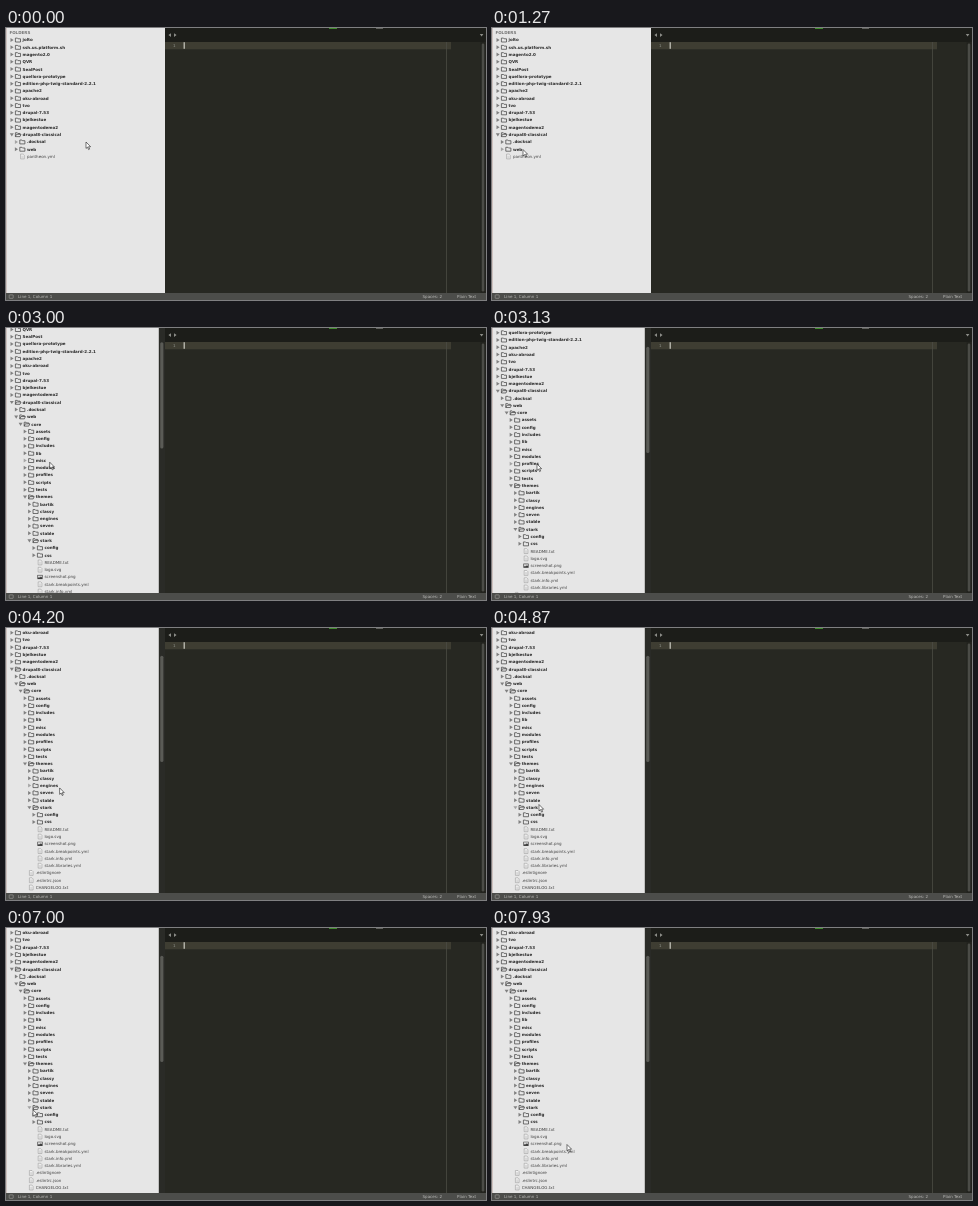
An HTML page that plays this animation: 480x272 px, repeating every 8000 ms.

```html
<!DOCTYPE html>
<html lang="en">
<head>
<meta charset="utf-8">
<title>Editor sidebar</title>
<style>
  html, body { margin: 0; width: 100%; height: 100%; overflow: hidden; background: #272822; }
  svg { display: block; width: 100vw; height: 100vh; }
  text { font: 4.06px "DejaVu Sans", Verdana, sans-serif; text-rendering: geometricPrecision; white-space: pre; }
  .bold { font-weight: bold; }
  .tree text { fill: #2b2b2b; }
  .tree .head { fill: #747474; }
  .tree .file { fill: #404040; }
  .line { fill: none; stroke: #464646; stroke-width: .75; stroke-linejoin: round; }
  .page { fill: #f4f4f4; stroke: #8a8a8a; stroke-width: .5; }
  .status text { fill: #b9b9b6; }
</style>
</head>
<body>
<svg viewBox="0 0 480 272" preserveAspectRatio="none">
  <defs>
    <clipPath id="view"><rect width="159" height="265"/></clipPath>
  </defs>

  <rect width="480" height="272" fill="#272822"/>
  <rect x="159" width="321" height="14" fill="#1c1d19"/>
  <rect x="323" width="8" height="1" fill="#3f8a2c"/>
  <rect x="370" width="7" height=".8" fill="#6f706c"/>
  <path d="M165 5.2v3.8l-2.6-1.9zM168 5.2v3.8l2.6-1.9zM473.8 6h3.6l-1.8 2.6z" fill="#8c8d88"/>
  <rect x="159" y="14" width="286" height="7.3" fill="#3e3d32"/>
  <rect x="440" y="14" width=".8" height="251" fill="#4b4c44"/>
  <text x="167" y="19.2" fill="#90918b">1</text>
  <rect id="caret" x="177.7" y="14.2" width=".9" height="6.6" fill="#f8f8f0"/>
  <rect x="474.5" y="14" width="5.5" height="251" fill="#22231e"/>
  <rect x="475.7" y="15.5" width="2.6" height="248" rx="1.3" fill="#4b4c47"/>

  <rect width="159" height="265" fill="#e6e6e6"/>
  <g class="tree" clip-path="url(#view)"><g id="tree"></g></g>
  <rect width=".6" height="265" fill="#bfa9a4"/>
  <g id="bar">
    <rect x="152.8" width="6.2" height="265" fill="#2a2b27"/>
    <rect id="thumb" x="154.2" width="3.2" rx="1.6" fill="#5a5b56"/>
  </g>

  <g class="status">
    <rect y="265" width="480" height="7" fill="#4c4d4a"/>
    <rect x="3.2" y="266.9" width="4" height="3.4" rx=".5" fill="none" stroke="#a3a3a0" stroke-width=".6"/>
    <text x="12" y="270.2">Line 1, Column 1</text>
    <text x="416.5" y="270.2">Spaces: 2</text>
    <text x="451" y="270.2">Plain Text</text>
  </g>

  <path id="cursor" d="M0 0V6.4L1.5 5.1 2.6 7.6 3.6 7.1 2.6 4.7H4.6Z" fill="#fff" stroke="#1c1c1c" stroke-width=".6" stroke-linejoin="round"/>
</svg>

<script>
const $ = id => document.getElementById(id);
const PITCH = 7.28, TOP = 12, VIEW = 265;
const WEB = 15, HIDDEN = 71;
const LOOP = 8000, TICK = 0.015;

// Each entry: depth, then names; "+" marks an open folder, "=" a file.
const groups = [
  [0, "jolto ssh.us.platform.sh magento2.0 QVR SealPost quellora-prototype edition-php-twig-standard-2.2.1 apache2 oku-abroad tvo drupal-7.53 bjelkestue magentodemo2 +drupal8-classical"],
  [1, ".docksal web"],
  [2, "+core"],
  [3, "assets config includes lib misc modules profiles scripts tests +themes"],
  [4, "bartik classy engines seven stable +stark"],
  [5, "config css =README.txt =logo.svg =screenshot.png =stark.breakpoints.yml =stark.info.yml =stark.libraries.yml"],
  [3, "=.eslintignore =.eslintrc.json =CHANGELOG.txt"]
];

const CLOSED = "M-1.3 -2V2L1.8 0Z", OPEN = "M-2 -1.3H2L0 1.8Z";
const FOLDER = "M-2.6 2V-1.9H-.5L.1 -1.2H2.5V2Z";
const FOLDER_OPEN = "M-2.6 2V-1.9H-.7L-.1 -1.2H2V-.3M-2.6 2L-1.5 -.3H3L2 2Z";

function make(parent, tag, attrs, text) {
  const el = document.createElementNS("http://www.w3.org/2000/svg", tag);
  for (const key in attrs) el.setAttribute(key, attrs[key]);
  if (text) el.textContent = text;
  parent.appendChild(el);
  return el;
}

function addRow(depth, entry) {
  const file = entry[0] === "=", open = entry[0] === "+";
  const name = entry.replace(/^[+=]/, "");
  const x = 16.5 + 4.4 * depth;
  const g = make($("tree"), "g", {});
  const icon = make(g, "g", { transform: `translate(${x - 4.5} 0)` });
  const row = { g };
  if (!file) {
    row.arrow = make(g, "path", { d: open ? OPEN : CLOSED, transform: `translate(${x - 10.7} 0)` });
    row.icon = make(icon, "path", { class: "line", d: open ? FOLDER_OPEN : FOLDER });
  } else if (name.endsWith(".png")) {
    make(icon, "rect", { x: -2.6, y: -2.1, width: 5.2, height: 4.2, fill: "#3a3a3a" });
    make(icon, "path", { d: "M-2 -1.5H2V.4L.9 -.5 -.2 .7 -1 .1 -2 1Z", fill: "#d8d8d8" });
  } else {
    make(icon, "path", { class: "page", d: "M-1.8 -2.4H.8L1.9 -1.3V2.4H-1.8Z" });
    make(icon, "path", { d: "M-1 -.4H1.1M-1 .5H1.1M-1 1.4H1.1", stroke: "#a5a5a5", "stroke-width": .35 });
  }
  make(g, "text", { x, y: 1.4, class: file ? "file" : "bold" }, name);
  return row;
}

const place = (row, y) => row.g.setAttribute("transform", `translate(0 ${y})`);

const head = make($("tree"), "text", { class: "head bold", x: 3.4, y: TOP - PITCH + 1.5 }, "FOLDERS");
const rows = groups.flatMap(([depth, names]) => names.split(" ").map(n => addRow(depth, n)));
const last = addRow(1, "=pantheon.yml");

// Pointer stops: tick, x, y
const pointer = [
  [8, 80, 114], [14, 46, 126], [19, 31, 121.5], [34, 32, 121.5], [35, 34, 122.5],
  [39, 40, 129], [41, 40, 129], [47, 45, 136], [54, 49, 146], [67, 55, 164],
  [73, 47, 176.5], [75, 47, 176.5], [80, 53, 201], [81, 53, 201], [84, 52, 209],
  [86, 52, 209], [88, 51.5, 213], [92, 51.5, 213], [98, 50, 231], [105, 27, 181.8],
  [110, 24.5, 177], [111, 24.5, 177], [119, 75, 216.5]
];
// Scroll stops: tick, rows
const scrolling = [[41, 0], [47, 6], [54, 6], [59, 9]];

function at(keys, tick) {
  const i = keys.findIndex(k => k[0] > tick);
  if (i === 0) return keys[0].slice(1);
  if (i < 0) return keys[keys.length - 1].slice(1);
  const a = keys[i - 1], b = keys[i];
  const p = (tick - a[0]) / (b[0] - a[0]);
  const e = p * p * (3 - 2 * p);
  return a.slice(1).map((v, n) => v + (b[n + 1] - v) * e);
}

function draw(ms) {
  const tick = Math.floor((ms + 5) * TICK) % (LOOP * TICK);
  const [x, y] = at(pointer, tick);
  const scroll = at(scrolling, tick)[0] * PITCH;
  const p = Math.min(1, Math.max(0, (tick - 24) / 7));
  const shown = HIDDEN * (1 - (1 - p) ** 2);
  const rowY = i => TOP + i * PITCH;

  $("tree").setAttribute("transform", `translate(0 ${-scroll})`);
  rows.forEach((row, i) => {
    place(row, rowY(i));
    row.g.style.display = i - WEB <= shown ? "" : "none";
    const over = Math.abs(rowY(i) - scroll - y) < PITCH / 2;
    if (row.arrow) row.arrow.setAttribute("fill", over ? "#a4a4a4" : "#808080");
  });
  place(last, rowY(WEB + 1 + shown));
  rows[WEB].arrow.setAttribute("d", p ? OPEN : CLOSED);
  rows[WEB].icon.setAttribute("d", p ? FOLDER_OPEN : FOLDER);

  const content = (WEB + 2 + shown) * PITCH + 8;
  const ratio = VIEW / content;
  $("bar").style.display = ratio < 1 ? "" : "none";
  $("thumb").setAttribute("y", 1 + scroll * ratio);
  $("thumb").setAttribute("height", Math.max(0, VIEW * ratio - 2));

  $("caret").setAttribute("opacity", tick === 2 ? .5 : 1);
  $("cursor").setAttribute("transform", `translate(${x} ${y})`);
}

const start = performance.now();
function loop(now) {
  draw(Math.max(0, now - start) % LOOP);
  requestAnimationFrame(loop);
}
draw(0);
requestAnimationFrame(loop);
</script>
</body>
</html>
```
